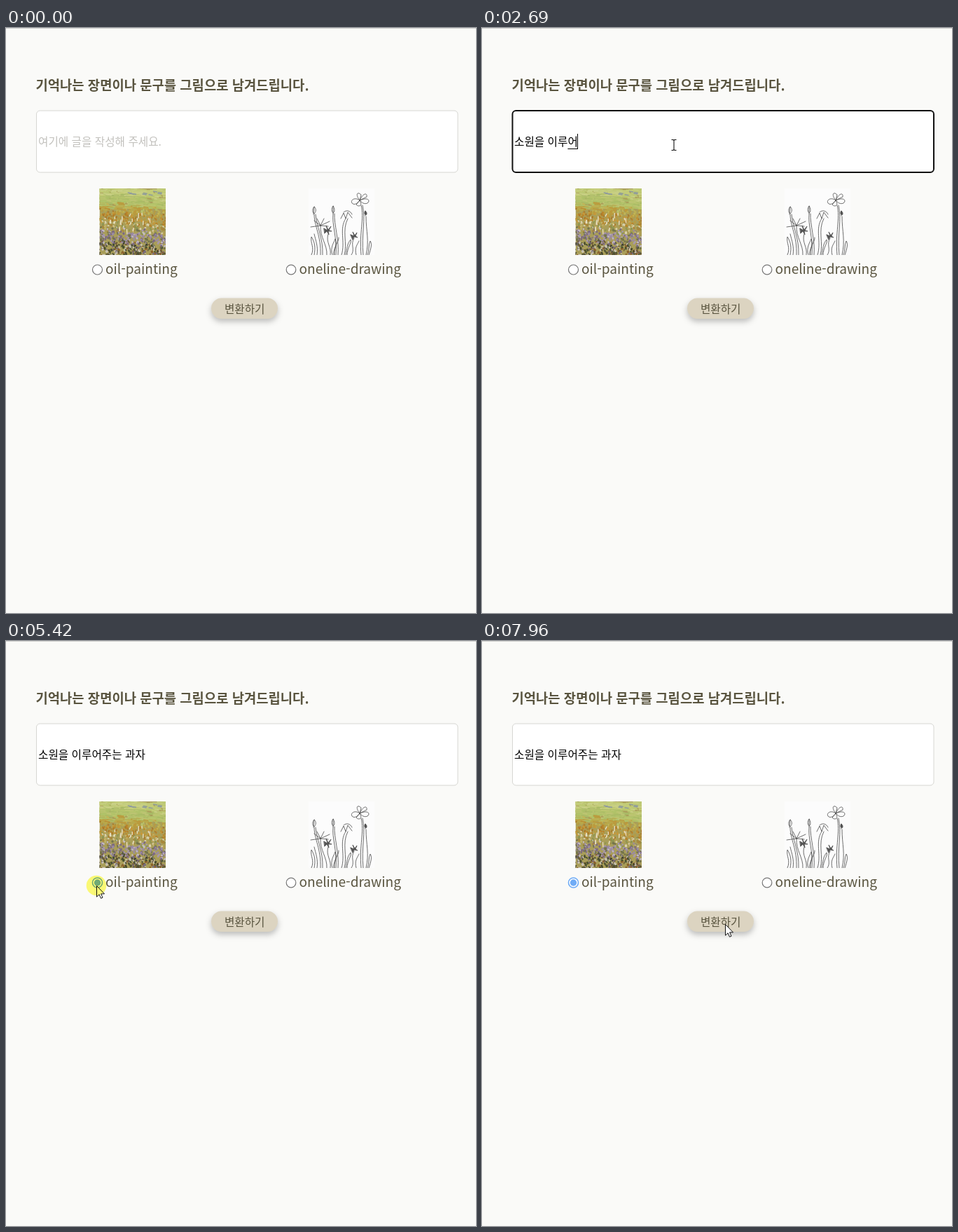
These frames come from a looping animation (671x835 px, 8000 ms). An HTML page:

```html
<!DOCTYPE html>
<html lang="ko">
<head>
<meta charset="utf-8">
<title>그림으로 남기기</title>
<style>
html, body { margin: 0; width: 100%; height: 100%; overflow: hidden; background: #fafaf8; }
svg { display: block; }
text { font-family: "Noto Sans CJK KR", "Noto Sans", sans-serif; fill: #59543f; white-space: pre; }
.title { font-size: 18.8px; font-weight: 700; }
.label { font-size: 19.06px; }
.small { font-size: 15.66px; }
#hint { fill: #c2c1bd; font-weight: 500; }
#typed { fill: #000; }
#box { fill: #fff; stroke: #d6d6d2; }
#box.focus { stroke: #111; stroke-width: 2px; }
.button { fill: #dcd4c1; filter: drop-shadow(0 4px 4.5px rgba(0, 0, 0, .25)); }
.radio { fill: #fff; stroke: #767676; stroke-width: 1.2px; }
.radio.hover { stroke: #4f4f4f; }
.radio.on { stroke: #70acf6; stroke-width: 1.6px; }
#dot { fill: #70acf6; }
#glow { fill: #fffd78; mix-blend-mode: multiply; }
#sketch { fill: none; stroke: #4a4a4a; stroke-width: .8; stroke-linecap: round; stroke-linejoin: round; }
</style>
</head>
<body>
<svg id="stage" width="671" height="835" viewBox="0 0 671 835">
  <rect width="671" height="835" fill="#fafaf8"/>
  <rect width="671" height="1" fill="#d3d3d1"/>
  <text class="title" x="42.5" y="88.8">기억나는 장면이나 문구를 그림으로 남겨드립니다.</text>

  <rect id="box" x="43.5" y="118" width="601.5" height="88" rx="5"/>
  <text id="hint" class="small" x="46" y="168.4">여기에 글을 작성해 주세요.</text>
  <text id="typed" class="small" x="46" y="168.4"></text>
  <rect id="under" y="172" height="1"/>
  <rect id="caret" y="151" width="1" height="22"/>

  <svg id="paint" x="133.5" y="229" width="94.5" height="95">
    <rect width="95" height="95" fill="#a99e59"/>
  </svg>

  <svg x="432" y="229" width="94" height="95">
    <rect width="94" height="95" fill="#fcfcfc"/>
    <g id="sketch">
      <path d="M73 17C67 12 59 16 62 21C66 25 71 20 73 17C66 8 70 4 75 9L73 17C78 6 84 6 83 12L73 17C84 12 89 17 84 21C79 23 76 20 73 17C78 25 71 27 68 23L73 17"/>
      <path d="M75 24C80 43 72 62 75 95M77 24C82 45 75 65 78 95"/>
      <path d="M81 32C79 35 80 37 82 38C84 36 83 34 81 32V39" fill="#555"/>
      <path d="M82 40C82 62 87 74 82 95M86 95C89 86 91 79 88 75C85 81 87 89 84 95"/>
      <path d="M35 25C32 29 33 33 35 35C38 33 37 28 35 25V36M35 36C33 52 41 70 39 95M37 36C36 51 44 74 42 95"/>
      <path d="M8 26C5 29 5 34 8 36C11 33 11 29 8 26L7 37M8 37C8 54 18 67 17 95M10 37C11 54 21 70 20 95"/>
      <path d="M46 43L50 35L53 43L56 34L62 42M50 34C54 30 60 32 62 37M53 43C43 58 53 76 47 95M56 43C47 60 56 78 51 95"/>
      <path d="M3 55L17 53L8 46M17 53L12 43M17 53L22 43M17 53L30 47M17 53L28 54M17 53C16 70 27 80 26 95"/>
      <path d="M22 57L27 60L25 53L28 59L32 54L29 60L33 61L28 61L29 66L26 61L23 64Z" fill="#555"/>
      <path d="M28 65C24 77 33 83 31 95M34 95C30 84 37 76 38 72C42 82 35 87 37 95"/>
      <path d="M60 66L65 68L63 62L66 67L69 63L67 68L70 70L65 69L63 73Z" fill="#555"/>
      <path d="M65 71C59 80 67 87 61 95M68 95C65 84 70 80 72 75M55 95C55 84 62 78 60 73C55 79 55 85 53 95"/>
      <path d="M4 95C9 84 2 78 4 69C9 77 10 84 8 95M12 95C14 83 10 74 8 65M36 95C35 83 44 76 43 70"/>
    </g>
  </svg>

  <circle id="first" class="radio" cx="130.5" cy="345" r="7"/>
  <circle id="dot" cx="130.5" cy="345" r="4.7"/>
  <text class="label" x="142" y="351">oil-painting</text>
  <circle class="radio" cx="407" cy="345" r="6.8"/>
  <text class="label" x="418.5" y="351">oneline-drawing</text>

  <rect class="button" x="293" y="385.5" width="95" height="29.5" rx="14.75"/>
  <text class="small" x="340.7" y="406.6" text-anchor="middle">변환하기</text>

  <path id="arrow" d="M.5 .5V16.2L4.1 12.8L6.5 18.3L9 17.2L6.6 11.9H11.5Z" fill="#fff" stroke="#111"/>
  <path id="beam" d="M-3.5 -7.5H-1L0 -6.5L1 -7.5H3.5M0 -6.5V6.5M-3.5 7.5H-1L0 6.5L1 7.5H3.5" fill="none" stroke="#111" stroke-width="1.1"/>
  <circle id="glow" r="14.3"/>
</svg>
<script>
const $ = id => document.getElementById(id);
const show = (id, on) => { $(id).style.display = on ? '' : 'none'; };
const within = (t, spans) => spans.some(([a, b]) => t >= a && t < b);

// Brush dabs, laid from the far meadow down to the foreground
const bands = [
  [.12, '#c3cb76 #bcc873 #c8cf84'],
  [.27, '#b0c268 #b9c56c #a9ba66 #bcc472'],
  [.36, '#b9a94a #bb9a3c #c0b558'],
  [.5, '#b9832a #a9782a #c6983a #b99a3e'],
  [.62, '#b8a052 #d9d2ae #8d9450 #a8873c #c2b468'],
  [.8, '#9a8aa5 #a898b0 #7c6a80 #74744c #c4bcc4'],
  [1.1, '#4f5232 #45502f #6f5d3a #7a6c7e #c9c3b2 #8a5f2c #44452c']
].map(([end, list]) => [end, list.split(' ')]);
let seed = 11;
const rnd = () => (seed = seed * 16807 % 2147483647) / 2147483647;

function dab(x, y, dx, dy, width, color) {
  const line = document.createElementNS('http://www.w3.org/2000/svg', 'path');
  line.setAttribute('d', `M${x} ${y}l${dx} ${dy}`);
  line.setAttribute('stroke', color);
  line.setAttribute('stroke-width', width);
  $('paint').append(line);
}
const count = 1200;
for (let i = 0; i < count; i++) {
  const v = i / count, x = rnd() * 105 - 10;
  const mix = v + (rnd() - .5) * .1 - (x - 47) * .0007;
  const colors = bands.find(b => mix < b[0])[1];
  const flat = v < .3;
  const color = colors[Math.floor(rnd() * colors.length)];
  dab(x, v * 97, flat ? 6 + rnd() * 10 : rnd() * 5 - 2.5, flat ? rnd() * 2 : 1.5 + rnd() * 2.5, 1.6 + rnd() * 1.6, color);
}
for (let i = 0; i < 9; i++) dab(36 + rnd() * 48, 4 + rnd() * 5, 6, 1, 1.5, '#8e9a9c');
for (let i = 0; i < 22; i++) dab(12 + rnd() * 60, 34 + rnd() * 24, 1 - rnd() * 3, 3 + rnd() * 5, 1.4, '#e6dfc2');

// Typing runs: first time, last time, text already set, what follows it at each step
const runs = [
  [1610, 1870, '', 'ㅅ|소|송|소우|소워'],
  [2010, 2220, '소', '원|원으|원을|원을 ㅇ'],
  [2480, 2690, '소원을 ', '이|일|이루|이루어'],
  [2880, 3620, '소원을 이루', '엊|어주|어준|어주느|어주는|어주는 ㄱ|어주는 고|어주는 과|어주는 괒|어주는 과자']
];
function typedAt(t) {
  let value = '';
  for (const [from, to, head, list] of runs) {
    if (t < from) break;
    const steps = list.split('|'), gap = (to - from) / (steps.length - 1);
    value = head + steps[Math.min(steps.length - 1, Math.floor((t - from) / gap + .01))];
  }
  return value;
}

// Pointer moves: first time, last time, steps, start, bend, end, steps already taken at the first time
const moves = [
  [530, 1210, 11, [489, 626], [300, 50], [274, 167], 0],
  [4420, 5090, 9, [274, 167], [195, 285], [129, 349], 1],
  [5740, 6340, 10, [129, 349], [230, 385], [334, 404], 1],
  [7630, 7631, 2, [334, 404], [340, 404], [347, 404], 1]
];
function pointerAt(t) {
  const move = moves.filter(m => t >= m[0]).pop();
  if (!move) return null;
  const [from, to, n, a, b, c, lead] = move;
  const step = Math.min(n - 1, Math.floor((t - from) / (to - from) * (n - 1) + .01));
  const p = (step + lead) / (n - 1 + lead);
  const e = p * p * (3 - 2 * p), q = 1 - e;
  return [0, 1].map(k => Math.round(q * q * a[k] + 2 * q * e * b[k] + e * e * c[k]));
}

function draw(t) {
  const focus = within(t, [[1340, 5420]]), checked = t >= 5420;
  const value = typedAt(t), text = $('typed');
  if (text.textContent !== value) text.textContent = value;
  const width = value ? text.getComputedTextLength() : 0;
  const last = value ? text.getSubStringLength(value.length - 1, 1) : 0;

  $('box').classList.toggle('focus', focus);
  show('hint', !value);
  show('under', focus && value);
  $('under').setAttribute('x', 46 + width - last);
  $('under').setAttribute('width', last);
  show('caret', focus && !within(t, [[3950, 4220], [4670, 5090]]));
  $('caret').setAttribute('x', Math.floor(46 + width));

  const at = pointerAt(t);
  const [x, y] = at || [0, 0];
  const inField = x > 43 && x < 645 && y > 117 && y < 207;
  show('beam', at && inField);
  show('arrow', at && !inField);
  $('beam').setAttribute('transform', `translate(${x} ${y})`);
  $('arrow').setAttribute('transform', `translate(${x} ${y})`);

  show('glow', within(t, [[1340, 1410], [5420, 5470], [6540, 6670], [7890, 7960]]));
  $('glow').setAttribute('cx', x);
  $('glow').setAttribute('cy', y);
  $('first').classList.toggle('hover', Math.hypot(x - 130.5, y - 345) < 8);
  $('first').classList.toggle('on', checked);
  show('dot', checked);
}

const start = performance.now();
function tick() {
  draw((performance.now() - start) % 8000);
  requestAnimationFrame(tick);
}
tick();
</script>
</body>
</html>
```
